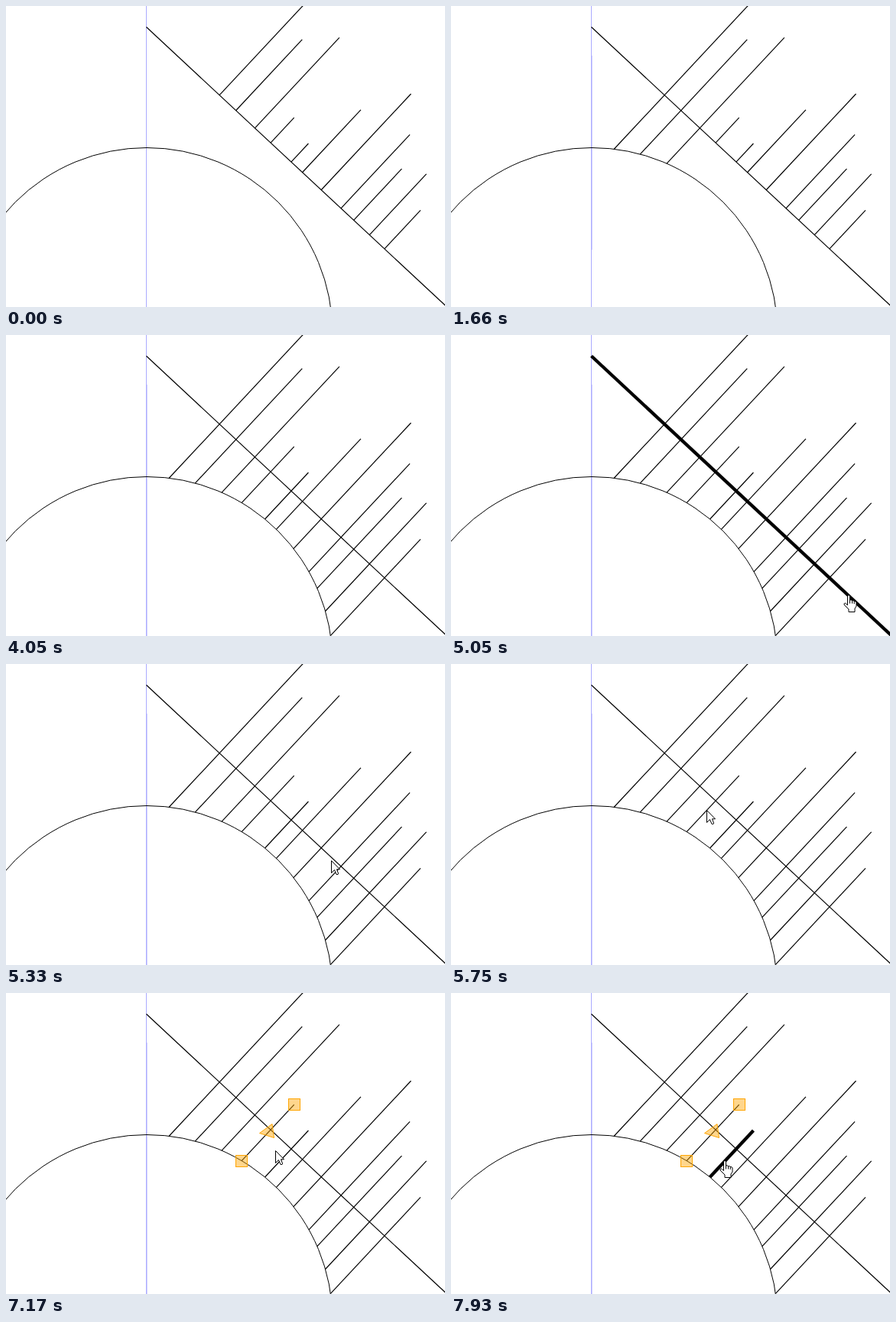
Write an HTML page that moves like this. It is 574 px wide and 394 px high and loops after 8 s.

```html
<!DOCTYPE html>
<html lang="en">
<head>
<meta charset="utf-8">
<title>Extending lines to an arc</title>
<style>
  html, body { margin: 0; width: 100%; height: 100%; overflow: hidden; background: #fff; }
  svg { display: block; width: 574px; height: 394px; }
</style>
</head>
<body>
<svg viewBox="0 0 574 394" fill="none" stroke="#000">
  <path d="M183.5 0V394" stroke="#aaf"/>
  <path id="axis" stroke="#d4d4ff"/>
  <circle id="arc"/>
  <g id="tilted">
    <path id="slope" d="M0 0H560"/>
  </g>
  <g id="grips" fill="#ffa500" fill-opacity=".45" stroke="#ffa500">
    <rect x="369.5" y="138.5" width="15" height="15"/>
    <rect x="300.5" y="212.5" width="15" height="15"/>
    <path d="M331.5 183.5L348 171.5L350.5 189.5Z"/>
  </g>
  <g id="cursor" fill="#fff" stroke-linejoin="round">
    <path id="arrow" d="M.5 .5V16.5L4.5 12.5L7 18.5H9L9.5 17L7.5 11.8H11.5Z"/>
    <path id="hand" d="M-.5 12V2a1.5 1.5 0 0 1 3 0V7q1.5-1 3 .7q1.5-.6 2.7.8q2.3-.3 2.8 1.5V15L9 18V22.5H1V19L-5 13q-.5-2 1.5-2L-.5 13.5ZM2.5 7V11.5M5.5 7.7V11.5M8.2 8.5V12"/>
  </g>
</svg>
<script>
const LOOP = 8000, STEP = 70, THIN = 1.2, THICK = 4.3;
const FIRST = 930, EVERY = 312;
const TILT = 43, ORIGIN = [183.5, 27.5];
const ARC = { cx: 184, cy: 428.5, r: 243 };

const $ = id => document.getElementById(id);
const set = (el, attrs) => { for (const k in attrs) el.setAttribute(k, attrs[k]); };
const show = (el, on) => set(el, { display: on ? "inline" : "none" });
const between = (t, a, b) => t >= a && t < b;

set($("arc"), ARC);
set($("tilted"), { transform: `translate(${ORIGIN}) rotate(${TILT})` });

// arc centre in the tilted system
const cos = Math.cos(TILT * Math.PI / 180), sin = Math.sin(TILT * Math.PI / 180);
const dx = ARC.cx - ORIGIN[0], dy = ARC.cy - ORIGIN[1];
const centre = { x: dx * cos + dy * sin, y: dy * cos - dx * sin };
const depth = x => centre.y - Math.sqrt(ARC.r ** 2 - (x - centre.x) ** 2);

// distance along the slope, height above it
const rays = [
  [130.7, 162], [160.2, 127], [194, 162], [222.2, 45], [259, 33], [279, 112],
  [312.7, 172], [348, 132], [370.8, 92], [399, 109], [425.8, 69]
].map(([x, height]) => {
  const el = document.createElementNS("http://www.w3.org/2000/svg", "path");
  $("tilted").append(el);
  return { el, x, height };
});

// pointer moves: start, end, goal x and y, ease-out power for x and y
const home = [519, 340];
const moves = [
  [5050, 5890, 323, 186, 1.6, 1.9],
  [6090, 6560, 330, 193, 1, 1],
  [6630, 6770, 336, 192, 1, 1],
  [6960, 7450, 359, 222, 2.1, 1.1],
  [7790, 7930, 357, 219, 1, 1]
];

function pointer(t) {
  let [x, y] = home;
  for (const [start, end, goalX, goalY, px, py] of moves) {
    if (t < start) break;
    const passed = Math.floor((t - start) / STEP) * STEP;
    const left = Math.max(0, 1 - passed / (end - start));
    x = goalX + (x - goalX) * left ** px;
    y = goalY + (y - goalY) * left ** py;
  }
  return [Math.round(x), Math.round(y)];
}

function draw(t) {
  const extended = Math.floor((t - FIRST) / EVERY) + 1;
  rays.forEach(({ el, x, height }, i) =>
    set(el, { d: `M${x} ${-height}V${i < extended ? depth(x) : 0}` }));
  set($("axis"), { d: `M184.5 65V${extended < 9 ? 319 : 394}` });
  show($("axis"), extended > 0);

  const hovered = between(t, 5050, 5190) ? $("slope")
    : between(t, 6700, 7100) ? rays[3].el
    : t >= 7860 ? rays[4].el : null;
  for (const el of $("tilted").children)
    set(el, { "stroke-width": el === hovered ? THICK : THIN });

  show($("grips"), t >= 7030);
  show($("cursor"), t >= 5050);
  show($("hand"), hovered);
  show($("arrow"), !hovered);
  set($("cursor"), { transform: `translate(${pointer(t)})` });
}

const start = performance.now();
function tick() {
  draw((performance.now() - start) % LOOP);
  requestAnimationFrame(tick);
}
tick();
</script>
</body>
</html>
```
